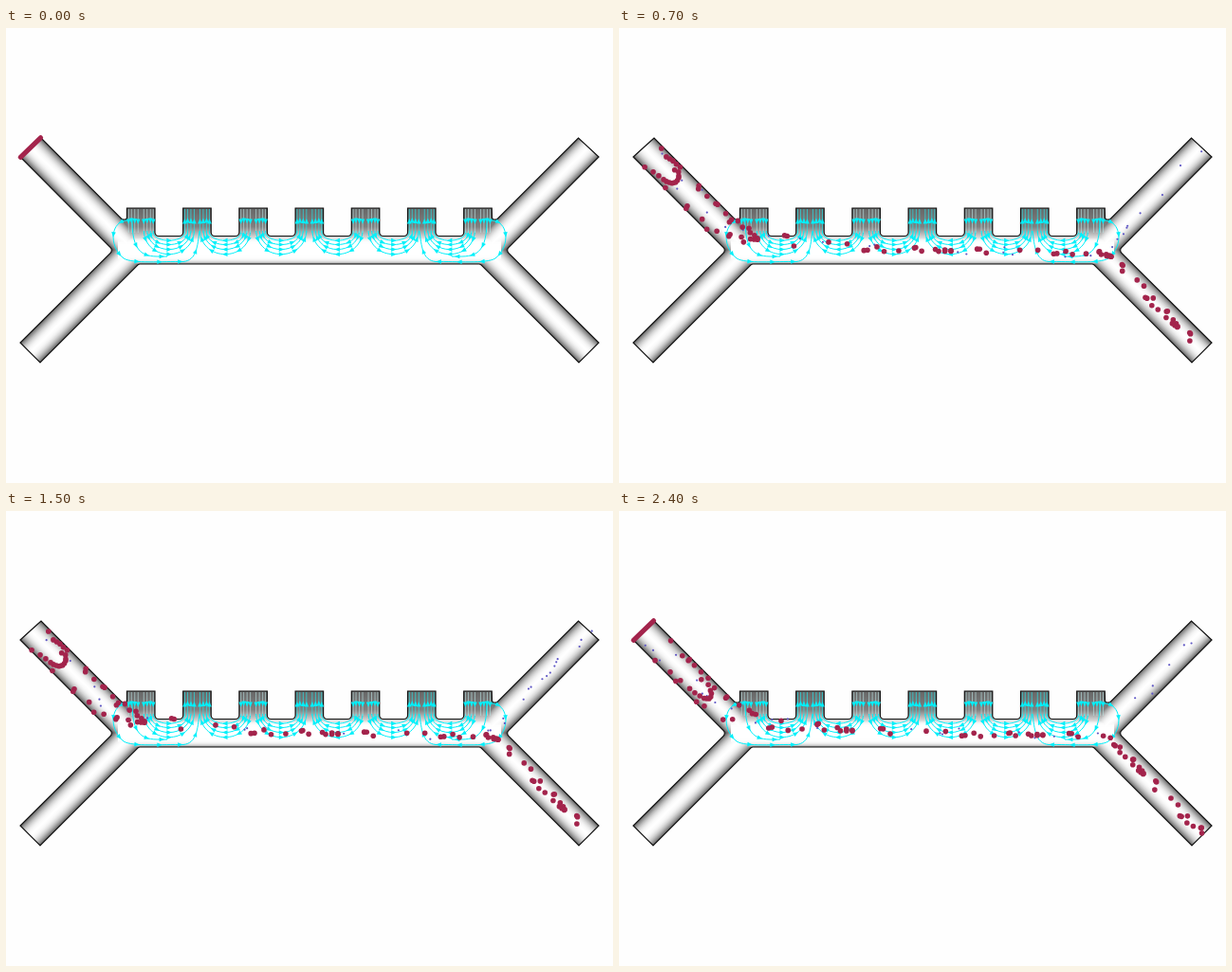
An HTML page with a canvas for the animation above (2.5 s loop, 640x480 px).

```html
<!DOCTYPE html>
<html lang="en">
<head>
<meta charset="utf-8">
<title>Particle separation in a micro channel</title>
<style>
  html, body { margin: 0; width: 100%; height: 100%; overflow: hidden; background: #fefefe; }
  canvas { display: block; }
</style>
</head>
<body>
<canvas id="stage" width="640" height="480"></canvas>
<script>
const STEP = 100, STEPS = 25, PITCH = 59.2, WELLS = 7, WELL_WIDTH = 29.5;
const RED = '#a3244c', BLUE = '#5d55c4', CYAN = '#00f0fa';
const ctx = document.getElementById('stage').getContext('2d');
const backdrop = document.createElement('canvas');
backdrop.width = 640;
backdrop.height = 480;
const bg = backdrop.getContext('2d');
const wellX = i => 127.5 + PITCH * i;

// Closed device contour; each point is [x, y, corner radius].
function contour() {
  const top = [[37, 116, 0], [122.5, 202, 3], [127.5, 202, 2]];
  for (let i = 0; i < WELLS; i++) {
    const l = wellX(i), r = l + WELL_WIDTH;
    if (i) top.push([l, 219.5, 4]);
    top.push([l, 190, 0], [r, 190, 0]);
    if (i < WELLS - 1) top.push([r, 219.5, 4]);
  }
  const points = [...top,
    [512.5, 202, 2], [517.5, 202, 3], [603.5, 116, 0], [625, 136, 0], [527, 234.5, 4],
    [625, 332, 0], [604, 353, 0], [500, 249, 3], [140, 249, 3],
    [36, 353, 0], [15, 332, 0], [113, 234.5, 4], [15, 136, 0]];
  const path = new Path2D();
  path.moveTo(26, 126);
  points.forEach(([x, y, r], i) => {
    const [nx, ny] = points[(i + 1) % points.length];
    path.arcTo(x, y, nx, ny, r);
  });
  path.closePath();
  return path;
}

// Brightness follows the flow speed: nested strokes, brighter towards the axis.
function shade(x1, y1, x2, y2, dark, power) {
  for (let w = 30; w > 0; w--) {
    const v = 255 - dark * (w / 30) ** power;
    bg.strokeStyle = `rgb(${v},${v},${v})`;
    bg.lineWidth = w;
    bg.beginPath();
    bg.moveTo(x1, y1);
    bg.lineTo(x2, y2);
    bg.stroke();
  }
}

function arrow(x, y, angle) {
  bg.save();
  bg.translate(x, y);
  bg.rotate(angle);
  bg.fillStyle = CYAN;
  bg.beginPath();
  bg.moveTo(3, 0);
  bg.lineTo(-2.5, -2.3);
  bg.lineTo(-2.5, 2.3);
  bg.fill();
  bg.restore();
}

// Cubic field line p0..p3 with arrowheads at the given parameters.
function fieldLine(p, heads, forward) {
  bg.strokeStyle = CYAN;
  bg.lineWidth = 1;
  bg.beginPath();
  bg.moveTo(...p[0]);
  bg.bezierCurveTo(...p[1], ...p[2], ...p[3]);
  bg.stroke();
  for (const t of heads) {
    const u = 1 - t;
    const at = c => u ** 3 * p[0][c] + 3 * u * u * t * p[1][c] + 3 * u * t * t * p[2][c] + t ** 3 * p[3][c];
    const slope = c => u * u * (p[1][c] - p[0][c]) + 2 * u * t * (p[2][c] - p[1][c]) + t * t * (p[3][c] - p[2][c]);
    arrow(at(0), at(1), Math.atan2(slope(1), slope(0)) + (forward ? 0 : Math.PI));
  }
}

function drawField() {
  const offsets = [3, 6.5, 10, 13];
  for (let i = 0; i < WELLS; i++) {
    const a = wellX(i) + WELL_WIDTH / 2, b = a + PITCH, even = i % 2 === 0;
    for (const o of offsets) {
      for (const x of [a - o, a + o]) {
        bg.strokeStyle = even ? 'rgba(185,225,225,.65)' : 'rgba(40,225,230,.7)';
        bg.lineWidth = 1;
        bg.beginPath();
        bg.moveTo(x, 191);
        bg.lineTo(x, 216);
        bg.stroke();
        arrow(x, 203 + (o % 2), even ? Math.PI / 2 : -Math.PI / 2);
      }
      if (i === WELLS - 1) continue;
      const depth = 216 + (27.5 - 1.45 * o) / .75;
      const spread = o > 9 ? 2 : -2;
      fieldLine([[a + o, 214], [a + o - spread, depth], [b - o + spread, depth], [b - o, 214]],
        o > 12 ? [.5] : [.1, .3, .5, .7, .9], even);
    }
  }
  // Wide loops around both ends of the channel.
  for (const m of [x => x, x => 640 - x]) {
    fieldLine([[m(128), 203], [m(111), 203], [m(107), 229], [m(124), 243]], [.15, .5, .9], true);
    fieldLine([[m(124), 243], [m(134), 249], [m(165), 246], [m(187), 246.5]], [.3, .65, .95], true);
    fieldLine([[m(187), 246.5], [m(201), 245], [m(202), 230], [m(204), 214]], [.5], true);
    fieldLine([[m(133), 203], [m(133), 244], [m(150), 241], [m(170), 241]], [.3, .6, .9], true);
  }
}

function drawBackdrop() {
  const shape = contour();
  bg.fillStyle = '#fefefe';
  bg.fillRect(0, 0, 640, 480);
  bg.save();
  bg.clip(shape);
  bg.fillStyle = '#484848';
  bg.fillRect(0, 0, 640, 480);
  bg.globalCompositeOperation = 'lighten';
  for (const x of [26, 614]) {
    for (const y of [126, 342]) {
      const dx = Math.sign(320 - x), dy = Math.sign(234 - y);
      shade(x - dx * 4, y - dy * 4, x + dx * 108, y + dy * 108, 165, 2.3);
    }
  }
  shade(118, 234, 522, 234, 110, 7);
  const fade = bg.createLinearGradient(0, 190, 0, 226);
  fade.addColorStop(0, '#666');
  fade.addColorStop(.55, '#808080');
  fade.addColorStop(1, '#fff');
  bg.fillStyle = fade;
  bg.fillRect(123, 190, 394, 36);
  bg.restore();
  bg.strokeStyle = '#111';
  bg.lineWidth = 1.2;
  bg.stroke(shape);
  drawField();
}

// Route nodes: [progress, x, y, lateral x, lateral y].
const ROUTE = [
  [0, 26, 126, .7, -.7], [2.3, 107, 207, .7, -.7], [3, 146, 222, 0, -.55],
  [4, 246, 231.5, 0, -.25], [5, 350, 235, 0, -.18], [6.6, 505, 237, 0, -.15],
  [7, 519, 241, .1, -.1], [8, 553, 277, .2, -.25], [9, 589, 315, .2, -.25],
  [9.75, 617, 340, .1, -.2]
];
const END = 9.75;

// Release lanes: [lateral offset, relative speed].
const LANES = [
  [12.7, .28], [10, .48], [11, .56], [12, .64], [12, .74], [6.4, .8], [7.8, .89], [5, .95],
  [3.5, .98], [.5, 1], [-2.1, 1], [-4, .98], [-5.6, .96], [-7, .91], [-8.5, .85],
  [-9.2, .78], [-10, .65], [-11.3, .51], [-14, .31]
];

function locate(q, side) {
  let i = 1;
  while (ROUTE[i][0] < q) i++;
  const a = ROUTE[i - 1], b = ROUTE[i], f = (q - a[0]) / (b[0] - a[0]);
  const [, x, y, sx, sy] = a.map((v, c) => v + (b[c] - v) * f);
  return [x + sx * side, y + sy * side];
}

function dot(x, y, r, color) {
  ctx.fillStyle = color;
  ctx.beginPath();
  ctx.arc(x, y, r, 0, 7);
  ctx.fill();
}

function random(seed) {
  return () => {
    seed = (seed * 1664525 + 1013904223) >>> 0;
    return seed / 4294967296;
  };
}

function drawSmall(step, clock) {
  const rand = random(step * 7919 + 17);
  for (let i = 0; i < 32; i++) {
    const q = rand() * END, side = rand() * 22 - 11;
    const jx = rand() * 8 - 4, jy = rand() * 8 - 4;
    if (q >= clock) continue;
    const [x, y] = locate(q, side);
    dot(x + jx, (q > 6.6 ? 468 - y : y) + jy, 1.1, BLUE);
  }
}

// A fresh row leaves the inlet every two clock units.
function drawLarge(clock) {
  for (const [side, speed] of LANES) {
    for (let age = clock; age > 0; age -= 2) {
      const q = speed * age < 3 ? speed * age : age - 3 / speed + 3;
      if (q < END) dot(...locate(q, side), 2.8, RED);
    }
  }
  if (clock % 2) return;
  ctx.strokeStyle = RED;
  ctx.lineWidth = 5.2;
  ctx.lineCap = 'round';
  ctx.beginPath();
  ctx.moveTo(15.3, 136.3);
  ctx.lineTo(36.5, 115.8);
  ctx.stroke();
}

function frame() {
  const step = Math.floor((performance.now() - start) / STEP) % STEPS;
  const clock = 3 * step + (step > 0 && step < 6 ? 1 : 0);
  ctx.drawImage(backdrop, 0, 0);
  drawSmall(step, clock);
  drawLarge(clock);
  requestAnimationFrame(frame);
}

drawBackdrop();
const start = performance.now();
frame();
</script>
</body>
</html>
```
